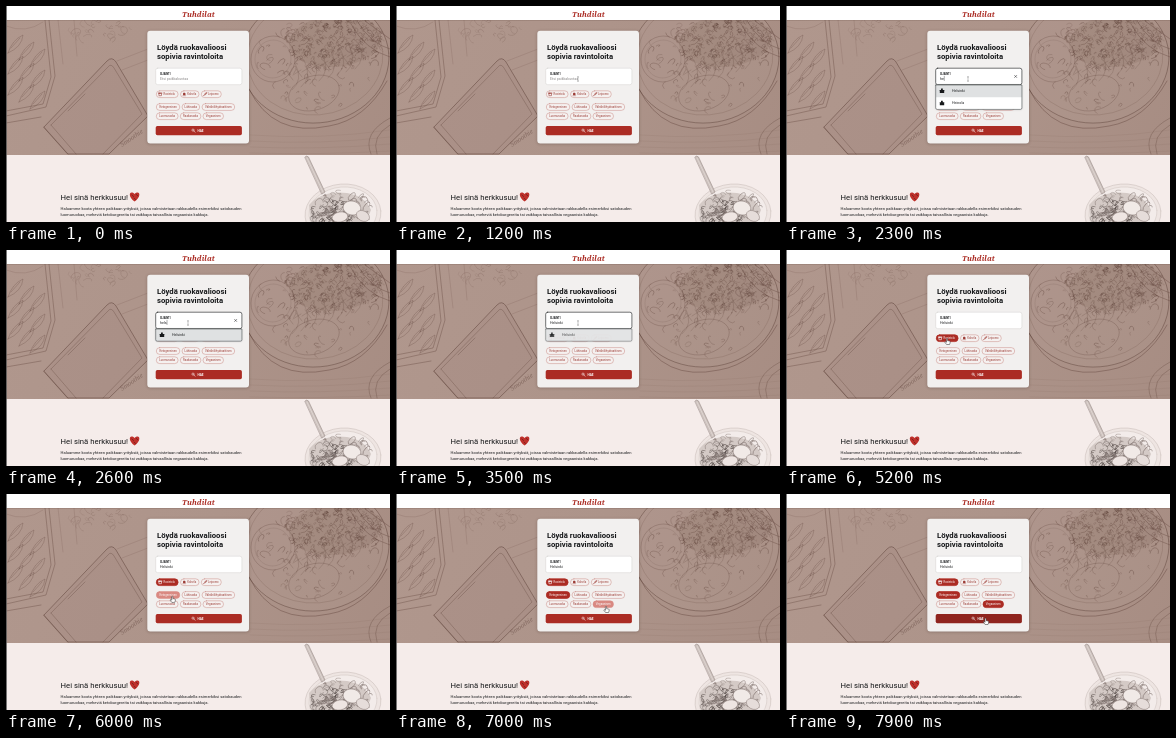
An HTML page with a canvas that plays this animation: 384 by 216 pixels, repeating every 8 s.

```html
<!DOCTYPE html>
<html lang="fi">
<head>
<meta charset="utf-8">
<title>Ravintolahaku</title>
<style>
html, body { margin: 0; width: 100%; height: 100%; overflow: hidden; background: #fff; }
canvas { display: block; width: 100vw; height: 100vh; }
</style>
</head>
<body>
<canvas id="stage"></canvas>
<script>
const W = 384, H = 216, LOOP = 8000;
const RED = '#ab2c24', INK = '#17191b', PINK = '#d98982';
const canvas = document.getElementById('stage');
const backdrop = document.createElement('canvas');
let c;

const clamp = v => Math.max(0, Math.min(1, v));
const ramp = (t, start, length) => clamp((t - start) / length);
const smooth = v => v * v * (3 - 2 * v);

function seeded(seed) {
  return () => (seed = (seed * 16807) % 2147483647) / 2147483647;
}

// Laid out at ten times the size so that small glyphs keep true spacing.
function text(str, x, y, size, { color = INK, weight = 400, align = 'left', font = 'Roboto, sans-serif', turn = 0 } = {}) {
  c.save();
  c.translate(x, y);
  c.rotate(turn);
  c.scale(0.1, 0.1);
  c.font = `${weight} ${size * 10}px ${font}`;
  c.fillStyle = color;
  c.textAlign = align;
  c.fillText(str, 0, 0);
  c.restore();
}

function box(x, y, w, h, r, fill, stroke, width = 0.5) {
  c.beginPath();
  c.roundRect(x, y, w, h, r);
  if (fill) { c.fillStyle = fill; c.fill(); }
  if (stroke) { c.strokeStyle = stroke; c.lineWidth = width; c.stroke(); }
}

function path(d, stroke, width = 0.6, fill) {
  const p = new Path2D(d);
  if (fill) { c.fillStyle = fill; c.fill(p); }
  if (stroke) { c.strokeStyle = stroke; c.lineWidth = width; c.stroke(p); }
}

function oval(x, y, rx, ry, turn, stroke, width = 0.5, fill) {
  c.beginPath();
  c.ellipse(x, y, rx, ry, turn, 0, 7);
  if (fill) { c.fillStyle = fill; c.fill(); }
  if (stroke) { c.strokeStyle = stroke; c.lineWidth = width; c.stroke(); }
}

// Small leaf and bean outlines scattered inside an ellipse.
function scatter(rnd, count, x, y, rx, ry, size, color) {
  for (let i = 0; i < count; i++) {
    const a = rnd() * 6.28, r = Math.sqrt(rnd());
    const px = x + Math.cos(a) * r * rx, py = y + Math.sin(a) * r * ry;
    const s = size * (0.35 + rnd());
    c.beginPath();
    c.ellipse(px, py, s, s * (0.3 + rnd() * 0.6), rnd() * 3.14, rnd() * 2, 3 + rnd() * 3.3);
    c.strokeStyle = color;
    c.lineWidth = 0.3 + rnd() * 0.4;
    c.stroke();
  }
}

function hero() {
  c.save();
  c.beginPath();
  c.rect(0, 14, W, 135);
  c.clip();
  const g = c.createLinearGradient(0, 14, W, 148);
  g.addColorStop(0, '#b0978d');
  g.addColorStop(0.5, '#ad948a');
  g.addColorStop(1, '#a78d83');
  c.fillStyle = g;
  c.fillRect(0, 14, W, 135);
  const line = 'rgba(92,64,56,.5)', faint = 'rgba(92,64,56,.25)';
  const rnd = seeded(41);

  // Sliced vegetables on a tray
  for (let i = 0; i < 9; i++) {
    const x = 2 + (i % 3) * 11, y = 32 + i * 7;
    path(`M${x} ${y + 15}Q${x + 4} ${y + 2} ${x + 15} ${y - 3}Q${x + 14} ${y + 9} ${x} ${y + 15}M${x + 3} ${y + 10}l9 -10`, line, 0.5);
  }
  path('M39 14L45 71L37 98L0 105M43 14L49 70L40 101L0 110M0 117L35 111', line, 0.7);
  path('M52 14L57 58M68 14L71 50M0 20Q20 28 37 16', faint);
  scatter(rnd, 24, 90, 25, 42, 10, 4, faint);

  // Tilted board with lettering
  path('M38 121L101 55Q106 50 110 56L142 110L103 148H62Z', line, 1, 'rgba(93,68,61,.05)');
  path('M45 119L102 61Q105 57 108 62L136 108L97 148', line, 0.6);
  path('M38 121L62 148M45 119L70 148M62 105L79 88', line, 0.6);
  path('M111 55L142 43M116 64L142 54', faint);
  text('Smoothie', 116, 141, 7, { color: line, weight: 'italic 400', font: '"Liberation Serif", serif', turn: -0.6 });

  // Plate of salad
  oval(309, 53, 74, 64, -0.08, line, 0.9, 'rgba(205,190,181,.06)');
  oval(309, 51, 68, 58, -0.08, faint, 0.7);
  path('M243 83Q267 132 323 120Q359 114 381 75', line, 0.8);
  oval(267, 53, 22, 23, 0.2, line);
  oval(267, 53, 18, 19, 0.2, faint);
  oval(308, 87, 26, 17, -0.3, line);
  oval(329, 35, 46, 26, -0.1, null, 0, 'rgba(98,72,62,.12)');
  scatter(rnd, 75, 309, 52, 63, 53, 4, line);
  scatter(rnd, 320, 328, 36, 51, 29, 2, line);
  for (let i = 0; i < 8; i++) path(`M${286 + i * 9} ${84 - i * 3}q12 -10 3 -27m-2 12l8 -5m-8 10l-6 -8`, line, 0.4);
  path('M345 18Q359 44 384 51M351 15Q365 38 384 43M359 15L384 33', line, 0.7);

  // Table top
  for (let i = 0; i < 4; i++) path(`M244 ${129 + i * 6}q70 ${5 - i} 140 ${-5 + i}`, faint, 0.3);
  path('M365 148Q356 127 384 112M371 148Q365 130 384 119', line);
  c.restore();
}

function bowl() {
  const rnd = seeded(97), line = '#81736f', faint = '#c4b8b4';
  c.save();
  c.beginPath();
  c.rect(285, 149, 99, 67);
  c.clip();
  oval(337, 208, 38, 30, -0.08, faint, 0.5, '#eee5e2');
  oval(337, 207, 34, 26, -0.08, faint, 0.4, '#f3ecea');
  path('M303 199Q316 184 341 187Q359 190 365 204L360 216H305Z', null, 0, '#d4cac6');
  scatter(rnd, 90, 327, 207, 25, 14, 2.8, '#514744');
  scatter(rnd, 45, 339, 200, 28, 15, 3.8, line);
  oval(346, 202, 9, 7, 0.2, line, 0.5, '#f1eae7');
  oval(334, 211, 8, 5, -0.2, line, 0.5, '#eee5e2');
  oval(357, 210, 7, 5, 0.5, line, 0.5, '#e6ddda');
  path('M299 151Q300.5 149 302.5 151L319 186L316 188Z', '#8e817d', 0.5, '#cbc0bc');
  path('M301 152L317 186', '#f0e8e5', 0.5);
  c.restore();
}

function heart(x, y) {
  path(`M${x} ${y + 5}C${x - 8} ${y - 1} ${x - 4.5} ${y - 7} ${x} ${y - 2.5}C${x + 4.5} ${y - 7} ${x + 8} ${y - 1} ${x} ${y + 5}Z`, null, 0, '#bf302b');
  path(`M${x - 2.7} ${y - 1.6}l1.7 1.5m2.5 -2.2l1.8 1.6m-3.8 2.3l1.4 1.3`, '#70201e', 0.8);
}

function scene() {
  c.fillStyle = '#f5ecea';
  c.fillRect(0, 0, W, H);
  hero();
  c.fillStyle = '#fff';
  c.fillRect(0, 0, W, 14);
  c.fillStyle = 'rgba(70,45,38,.25)';
  c.fillRect(0, 14, W, 0.6);
  text('Tuhdilat', 192.5, 10.5, 7.4, { color: RED, weight: 'italic 700', align: 'center', font: '"Noto Serif", serif' });

  c.save();
  c.shadowColor = 'rgba(45,25,20,.3)';
  c.shadowBlur = 3;
  c.shadowOffsetY = 0.6;
  box(141.3, 24.7, 101.7, 112.8, 3, '#f2f0ef');
  c.restore();
  text('Löydä ruokavalioosi', 151, 44, 7.75, { weight: 700 });
  text('sopivia ravintoloita', 151, 53, 7.75, { weight: 700 });

  text('Hei sinä herkkusuu!', 54.5, 193.8, 7.75);
  heart(128.6, 190.6);
  text('Haluamme koota yhteen paikkaan yrityksiä, joissa valmistetaan rakkaudella esimerkiksi satokauden', 54.5, 204, 4.1);
  text('luomuruokaa, meheviä ketoburgereita tai vaikkapa taivaallisia vegaanisia kakkuja.', 54.5, 210.2, 4.1);
  bowl();
}

// label, left, centre line, width, icon, hover time, press time
const chips = [
  ['Ravintola', 150.3, 88.2, 21.8, 'shop', 4400, 4900],
  ['Kahvila', 174.5, 88.2, 18.5, 'cup'],
  ['Leipomo', 195.3, 88.2, 20, 'whisk'],
  ['Ketogeeninen', 150.3, 101, 23.5, '', 5800, 6200],
  ['Lähiruoka', 176, 101, 17.7, ''],
  ['Vähähiilihydraattinen', 196, 101, 32.7, ''],
  ['Luomuruoka', 150.3, 110.2, 21.8, ''],
  ['Raakaruoka', 174.3, 110.2, 20.6, ''],
  ['Vegaaninen', 197, 110.2, 20.5, '', 6900, 7200]
];

function icon(kind, x, y, color) {
  if (kind === 'shop') {
    box(x - 1.3, y - 0.9, 2.6, 2.4, 0.2, null, color, 0.6);
    path(`M${x - 1.7} ${y - 1.1}h3.4`, color, 0.8);
  } else if (kind === 'cup') {
    box(x - 1.4, y - 1.4, 2.3, 2.5, 0.7, color);
    path(`M${x + 0.8} ${y - 0.8}q1.3 .6 0 1.3M${x - 1.5} ${y + 1.5}h2.8`, color, 0.4);
  } else {
    path(`M${x - 1.5} ${y + 1.5}L${x + 1.4} ${y - 1.4}`, color, 0.8);
    oval(x + 0.6, y - 0.6, 1.2, 0.7, -0.78, color, 0.4);
  }
}

function chip([label, x, y, w, kind, hover, press], t) {
  const over = hover !== undefined && t >= hover;
  const on = over ? ramp(t, press, 300) : 0;
  const color = over ? '#fff' : '#9c3d36';
  box(x, y - 3.4, w, 6.8, 3.4, over ? PINK : '#f5f1f0', over ? PINK : '#c98a84', 0.5);
  if (on) {
    c.globalAlpha = on;
    box(x, y - 3.4, w, 6.8, 3.4, RED, RED);
    c.globalAlpha = 1;
  }
  if (kind) icon(kind, x + 3.9, y, color);
  text(label, x + w / 2 + (kind ? 2 : 0), y + 1, kind ? 2.75 : 2.85, { color, align: 'center' });
}

const cities = ['Helsinki', 'Hamina', 'Hanko', 'Heinola', 'Hyvinkää'];

function dropdown(typed, fade) {
  const found = cities.filter(n => n.toLowerCase().startsWith(typed));
  const row = 12.2;
  c.save();
  c.globalAlpha = fade;
  c.shadowColor = 'rgba(0,0,0,.25)';
  c.shadowBlur = 2;
  box(149.7, 79, 86.2, found.length * row, [0, 0, 1.5, 1.5], '#fff');
  c.shadowColor = 'transparent';
  box(149.7, 79, 86.2, row, 0, '#dfe1e2');
  found.forEach((name, i) => {
    const y = 85 + i * row;
    box(153.8, y - 0.9, 4.4, 2.9, 0.2, INK);
    box(155, y - 2.4, 1.8, 3, 0.2, INK);
    text(name, 166, y + 1.2, 3.6);
  });
  box(149.7, 79, 86.2, found.length * row, [0, 0, 1.5, 1.5], null, '#33383b', 0.5);
  c.restore();
}

function field(t) {
  const focus = t >= 1400 && t < 3600;
  const count = t < 2200 ? 0 : t < 2500 ? Math.floor((t - 2100) / 100) : t < 2600 ? 3 : Math.min(8, Math.floor((t - 2200) / 100));
  const typed = 'helsinki'.slice(0, count);
  box(149.7, 62.2, 86.2, 16.5, 2, '#fff', focus ? '#26292b' : '#d3d0cf', focus ? 0.65 : 0.5);
  text('SIJAINTI', 154, 68.7, 2.6, { weight: 700 });
  if (t < 2200) text('Etsi paikkakuntaa', 154, 73.8, 3.6, { color: '#8b8989' });
  else text(t < 3500 ? typed : 'Helsinki', 154, 73.8, 3.6);
  const blink = t >= 1900 && t < 2200 || t >= 3100;
  if (focus && !blink) {
    c.font = '400 36px Roboto, sans-serif';
    const x = 154.4 + c.measureText(typed).width / 10;
    path(`M${x} 70.3v4.3`, INK, 0.35);
  }
  if (count && t < 3500) path('M228.6 69.4l2.1 2.1m0 -2.1l-2.1 2.1', INK, 0.5);
  if (count && t < 3800) dropdown(typed, 1 - ramp(t, 3400, 400));
}

function button(t) {
  box(149.7, 120, 86.2, 9.2, 1.7, t >= 7600 ? '#8f241e' : RED);
  oval(187, 124.1, 1.1, 1.1, 0, '#fff', 0.5);
  path('M187.8 125l1.2 1.2', '#fff', 0.6);
  text('HAE', 191.4, 125.7, 3.2, { color: '#fff', weight: 700 });
}

// time, x, y
const track = [
  [700, 22, 148], [1200, 182, 73], [4000, 182, 73], [4200, 178.7, 80],
  [4400, 162, 90], [4600, 161, 89], [5600, 161, 89], [5800, 166, 103],
  [6500, 167, 102.5], [6600, 170, 103], [6900, 210, 113], [7400, 210, 113],
  [7600, 199.5, 125], [8000, 199.5, 125]
];

function pointer(t) {
  if (t < track[0][0]) return;
  const i = track.findIndex(k => k[0] > t);
  const [t0, x0, y0] = track[i - 1], [t1, x1, y1] = track[i];
  const p = smooth((t - t0) / (t1 - t0));
  c.save();
  c.translate(x0 + (x1 - x0) * p, y0 + (y1 - y0) * p);
  if (t >= 4400) path('M-.6 -.4Q0 -1.2 .6 -.4V1.6L2.7 2.1Q3.5 2.4 3.1 4L2.5 5.5H-.4L-2.2 3.1Q-1.8 2.1 -.6 3Z', '#252323', 0.5, '#fff');
  else if (t >= 1200) path('M-.6 -2.1H.6M0 -2.1V2.1M-.6 2.1H.6', '#555', 0.35);
  else path('M0 0V4.8L1.2 3.7L2 5.5L2.9 5.1L2.1 3.4H3.7Z', '#fff', 0.4, '#1b1b1b');
  c.restore();
}

function use(target, scale) {
  c = target.getContext('2d');
  c.setTransform(scale, 0, 0, scale, 0, 0);
  c.lineCap = c.lineJoin = 'round';
}

function fit() {
  const scale = Math.max(1, innerWidth / W * (devicePixelRatio || 1));
  for (const target of [canvas, backdrop]) {
    target.width = Math.round(W * scale);
    target.height = Math.round(H * scale);
  }
  use(backdrop, scale);
  scene();
  use(canvas, scale);
}

function draw(now) {
  const t = Math.floor((now % LOOP) / 100) * 100;
  c.drawImage(backdrop, 0, 0, W, H);
  chips.forEach(item => chip(item, t));
  button(t);
  field(t);
  pointer(t);
  c.fillStyle = '#555';
  c.fillRect(0, 0, 0.8, H);
}

let start;
function tick(now) {
  start ??= now;
  draw(Math.max(0, now - start));
  requestAnimationFrame(tick);
}

addEventListener('resize', fit);
fit();
draw(0);
requestAnimationFrame(tick);
</script>
</body>
</html>
```
